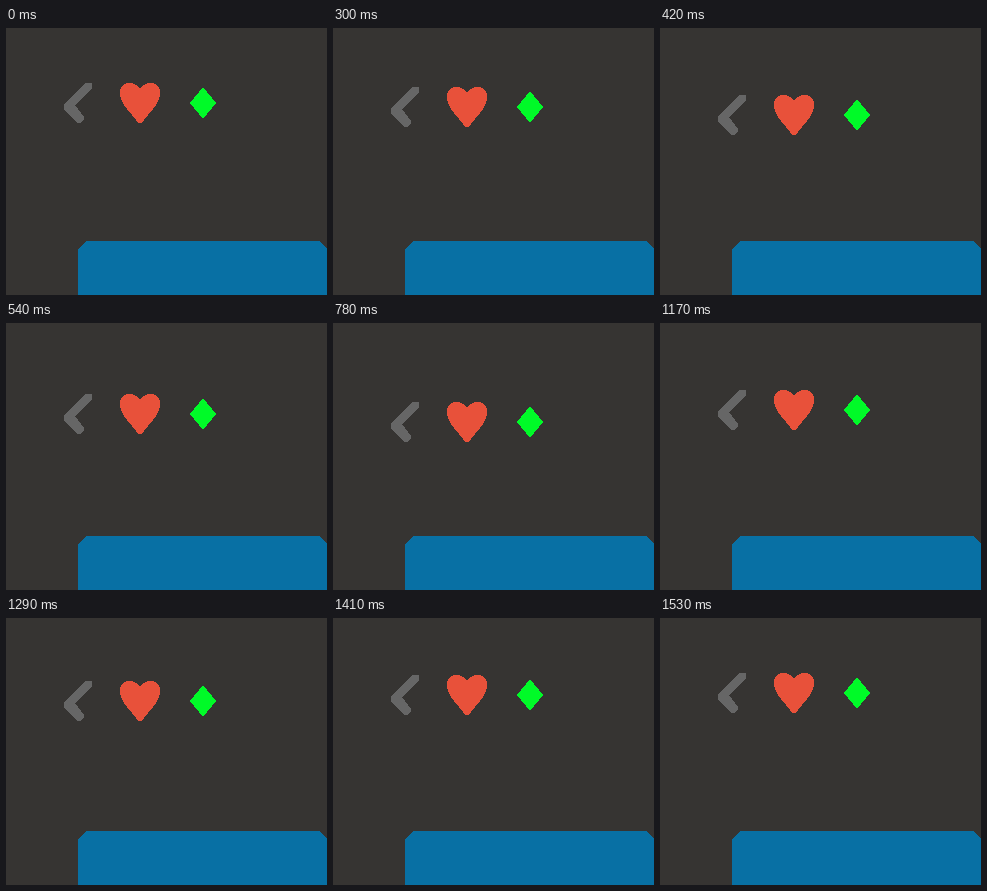
Write an HTML page that moves like this. It is 321 px wide and 267 px high and loops after 1.68 s.

```html
<!DOCTYPE html>
<html lang="en">
<head>
<meta charset="utf-8">
<title>Bobbing icons</title>
<style>
  html, body { margin: 0; width: 100%; height: 100%; overflow: hidden; background: #363432; }
  svg { display: block; }
</style>
</head>
<body>
<svg width="321" height="267" viewBox="0 0 321 267" shape-rendering="crispEdges">
  <g id="icons">
    <path fill="#666" d="M79 55H85L86 56V61L69 77L78 89V91L74 95H71L58 81V76Z"/>
    <path fill="#e8513a" d="M134 61C137 56 141 55 145 55C151 55 154 59 154 65C154 77 141 86 136 95H132C127 86 114 77 114 65C114 59 117 55 123 55C127 55 131 56 134 61Z"/>
    <path fill="#00fa28" d="M197 59L210 75L197 91L184 75Z"/>
  </g>
  <path fill="#0870a4" d="M72 267V221L80 213H313L321 221V267Z"/>
</svg>
<script>
  const LOOP = 1680, TICK = 60, STEP = 80;
  const DOWN = 180, UP = 930;
  const drops = [0, 2, 4, 8, 12, 16, 20, 22, 24];
  const icons = document.getElementById('icons');

  // Movement steps every 80 ms, shown on a 60 ms clock.
  function drop(elapsed) {
    if (elapsed < 0) return 0;
    const shown = Math.floor(elapsed / TICK) * TICK;
    return drops[Math.min(8, Math.floor(shown / STEP) + 1)];
  }

  function draw(now) {
    const t = now % LOOP;
    icons.setAttribute('transform', `translate(0 ${drop(t - DOWN) - drop(t - UP)})`);
  }

  const start = performance.now();
  function frame() {
    draw(performance.now() - start);
    requestAnimationFrame(frame);
  }
  draw(0);
  requestAnimationFrame(frame);
</script>
</body>
</html>
```
